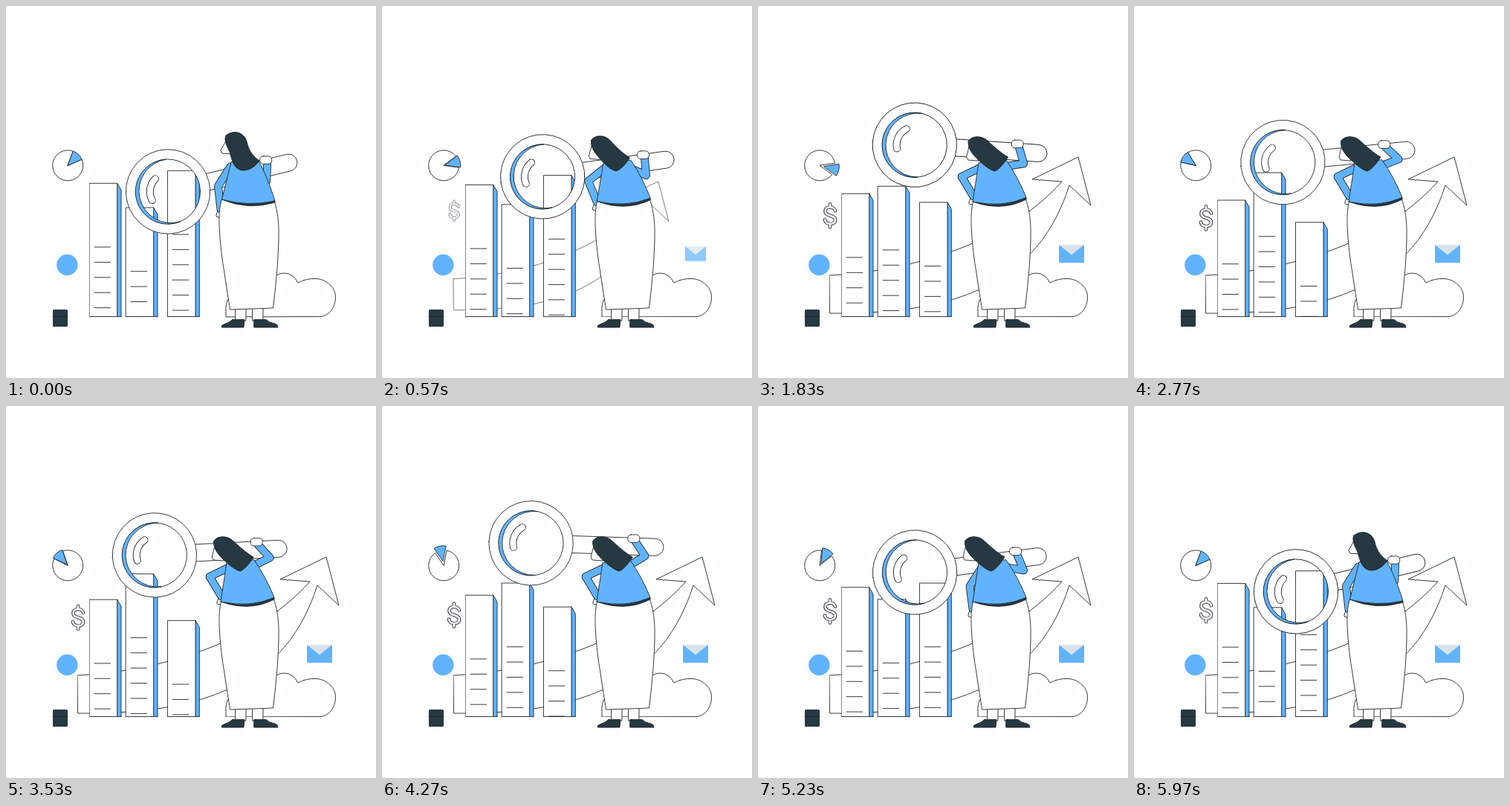
Recreate the animation shown at these times as an HTML page. Size 498 px wide and 500 px high, loop 6010 ms.

```html
<!DOCTYPE html>
<html lang="en">
<head>
<meta charset="utf-8">
<title>Data research</title>
<style>
html, body { margin: 0; width: 100%; height: 100%; overflow: hidden; background: #fff; }
svg { display: block; width: 498px; height: 500px; }
.line { fill: none; stroke: #20282c; stroke-width: .9; stroke-linejoin: round; stroke-linecap: round; vector-effect: non-scaling-stroke; }
.white { fill: #fff; }
.blue { fill: #62b3ff; }
.dark { fill: #263840; }
.tube { fill: none; stroke-linecap: round; stroke-linejoin: round; }

.pop { animation: pop 6.01s infinite; transform-box: fill-box; transform-origin: center; }
#arrow { transform-box: view-box; transform-origin: 96px 388px; }
#bob { animation: bob 6.01s ease-in-out infinite; }
.bar { animation: grow 6.01s cubic-bezier(.4, .06, .7, .9) infinite; }

@keyframes pop {
  0% { scale: .4; opacity: 0; animation-timing-function: cubic-bezier(.2, .5, .4, 1.18); }
  30%, 100% { scale: 1; opacity: 1; }
}
@keyframes bob {
  0%, 100% { translate: 97px 274.5px; }
  50% { translate: 97px 285px; }
}
@keyframes grow {
  0%, 100% { translate: 0 var(--from); }
  50% { translate: 0 var(--to); }
}
</style>
</head>
<body>
<svg viewBox="0 0 498 500">
  <defs>
    <clipPath id="floor"><rect width="498" height="418"/></clipPath>
  </defs>

  <path id="arrow" class="pop line white" d="M96.500 362C190 358 330 325 409 236L369 233 431 203 448 268 419 241C372 391 235 414 97 413Z"/>
  <path class="line white" d="M296 417.500V405Q297 393 303 390L362 363Q375 355 386 363Q390 366 393 372Q404 366 417 366.500C431 367 443.500 378 443.500 391C443.500 406 434 417.500 422 417.500Z"/>
  <g id="bars" clip-path="url(#floor)"></g>

  <g transform="translate(83.2 214.3)">
    <path id="disc" class="line white"/>
    <path id="slice" class="line blue"/>
  </g>
  <g id="bob"><g id="dollar" class="pop"></g></g>
  <circle class="blue" cx="82.3" cy="348" r="14.2"/>
  <rect class="dark" x="63" y="408" width="20" height="23" rx="1.5"/>
  <path class="line" d="M63 417.5H83"/>
  <g class="pop">
    <path class="blue" d="M405 321H439V345H405Z"/>
    <path fill="#d9e4ea" d="M405 321H439L422 334.500Z"/>
  </g>

  <g id="glass">
    <path class="line white" d="M50-11.7H167A11.3 11.3 0 0 1 167 11.3H50Z"/>
    <path class="line white" fill-rule="evenodd" d="M-56.7 0A56.7 56.7 0 1 1 56.7 0A56.7 56.7 0 1 1-56.7 0ZM-43.5 0A43.5 43.5 0 1 0 43.5 0A43.5 43.5 0 1 0-43.5 0Z"/>
    <path class="line blue" d="M7-42.9A43.5 43.5 0 1 0 7 42.9A43 43 0 1 1 7-42.9Z"/>
    <g id="shine"></g>
  </g>

  <g id="leftHand"></g>
  <g id="leftArm"></g>
  <g id="rightArm"></g>
  <rect id="fist" class="line white" x="-8" y="-5" width="16" height="10.5" rx="4.5"/>

  <path class="line white" d="M309 404H323V423H309ZM332 404H346V423H332Z"/>
  <path class="line dark" d="M305 421.5H321L320 432H290.500Q289 429 293 428Q300 426 305 421.500ZM334 421.500H350Q355 426 362 427Q366 428 366 432H334Z"/>
  <path class="line white" d="M290 261C284 280 288 315 291 340L301.500 408 359.500 406C364 370 367.500 330 367 300C367 285 364 270 360 258Z"/>
  <path id="hem" class="line dark"/>
  <path id="face" class="line white"/>
  <path id="shirt" class="line blue"/>
  <path id="hair" class="line dark"/>
</svg>
<script>
const LOOP = 6010, RAD = Math.PI / 180;
const $ = id => document.getElementById(id);
const set = (el, name, value) => el.setAttribute(name, value);
const place = (id, x, y, angle = 0) => set($(id), 'transform', `translate(${x} ${y}) rotate(${angle})`);

const mix = (a, b, q) => a + (b - a) * q;
const rise = (t, from, to) => {
  const u = Math.min(1, Math.max(0, (t - from) / (to - from)));
  return u * u * (3 - 2 * u);
};

// Blends two paths that share the same commands.
function mixPath([a, b], q) {
  const ends = b.match(/[\d.]+/g);
  return a.replace(/[\d.]+/g, n => mix(+n, +ends.shift(), q));
}

function make(parent, cls, d = '') {
  const el = document.createElementNS('http://www.w3.org/2000/svg', 'path');
  set(el, 'class', cls);
  set(el, 'd', d);
  return parent.appendChild(el);
}

// Outlined thick line: a dark stroke below a slightly thinner coloured one.
function tube(id, width, color, d) {
  const paths = [['#20282c', width + .9], [color, width - .9]].map(([stroke, w]) => {
    const el = make($(id), 'tube', d);
    set(el, 'stroke', stroke);
    set(el, 'stroke-width', w);
    return el;
  });
  return (...pts) => paths.forEach(el => set(el, 'd', 'M' + pts.join('L')));
}

// Elbow of an arm with two equal bones; side is 1 or -1.
function elbow([ax, ay], [bx, by], bone, side) {
  const dx = bx - ax, dy = by - ay, dist = Math.hypot(dx, dy);
  const h = side * Math.sqrt(Math.max(0, bone * bone - dist * dist / 4)) / dist;
  return [(ax + bx) / 2 - dy * h, (ay + by) / 2 + dx * h];
}

function addBar(x, from, to) {
  const g = $('bars').appendChild(document.createElementNS('http://www.w3.org/2000/svg', 'g'));
  set(g, 'class', 'bar');
  set(g, 'style', `--from: ${from}px; --to: ${to}px`);
  make(g, 'line blue', `M${x + 37.2} 0L${x + 42.5} 9V260H${x + 37.2}Z`);
  make(g, 'line white', `M${x} 0H${x + 37.2}V260H${x}Z`);
  for (let i = 0; i < 10; i++) make(g, 'line', `M${x + 6.5} ${85.7 + i * 20.4}h21.5`);
  make($('bars'), 'line', `M${x} 417.5h42.5`);
}
addBar(112.5, 238.3, 262);
addBar(161.5, 271, 222);
addBar(217.8, 221.3, 293.8);

tube('shine', 9, '#fff', 'M-12.4-20.8A24.2 24.2 0 0 0-23.4 6.3');
tube('dollar', 3.6, '#fff', 'M7-6.500C5.500-13-6.500-13-6.500-6C-6.500 2 7 -2 7 6C7 13-6.500 13-7 5.500M0-15.500V-11.500M0 11.500V15.500');
const drawLeft = tube('leftArm', 10, '#62b3ff');
const drawHand = tube('leftHand', 6, '#fff');
const drawRight = tube('rightArm', 10, '#62b3ff');

// Upright and leaning versions of each shape
const shapes = {
  hair: [
    'M296 174C306 166 320 169 324 182C327 196 333 202 341 208C335 216 328 221 319 221C306 220 304 206 301 196C297 188 293 180 296 174Z',
    'M280.5 182C284 174 298 174 305 180C315 189 325 198 334 203C329 211 322 220 316 222C308 220 297 210 291 204C284 197 280 190 280.5 182Z'],
  face: ['M299 176L289 194 291 198 304 199Z', 'M283 183L278 203 280 207 294 208Z'],
  shirt: [
    'M303 210L290.5 260Q325 270 362 262Q352 230 341 210Z',
    'M297 211L289 263Q328 272 361 257.5Q350 230 334 207Z'],
  hem: ['M290.5 260Q325 275 362 264V262Z', 'M289 263Q328 277 361 260V257.5Z']
};

// Swing of the magnifier: time, centre x, centre y, angle
const swing = [
  [0, 218, 249.5, -13.4], [1550, 212, 184, 5], [3000, 199.5, 212, -6.3],
  [4200, 200.5, 184, 2], [LOOP, 218, 249.5, -13.4]];

function glassAt(t) {
  const i = swing.findIndex(k => t < k[0]);
  const [from, to] = [swing[i - 1], swing[i]];
  const q = rise(t, from[0], to[0]);
  return [1, 2, 3].map(k => mix(from[k], to[k], q));
}

function drawPie(t) {
  const mid = -47 + 60 * rise(t, 0, 1100) + 202 * rise(t, 1800, 2800) + 98 * rise(t, 2800, LOOP);
  const out = 6.5 * Math.sin(2 * Math.PI * t / LOOP) ** 2, r = 20.5;
  const point = a => [r * Math.cos(a * RAD), r * Math.sin(a * RAD)];
  const from = point(mid - 23), to = point(mid + 23);
  set($('disc'), 'd', `M0 0L${to}A${r} ${r} 0 1 1 ${from}Z`);
  set($('slice'), 'd', `M0 0L${from}A${r} ${r} 0 0 1 ${to}Z`);
  place('slice', out * Math.cos(mid * RAD), out * Math.sin(mid * RAD));
}

function render(t) {
  const [cx, cy, angle] = glassAt(t);
  place('glass', cx, cy, angle);

  const lean = rise(Math.min(t, LOOP - t), 0, 780);
  for (const id in shapes) set($(id), 'd', mixPath(shapes[id], lean));
  const sway = lean * Math.max(-2, (197 - cy) / 4);
  place('hair', sway, 0);
  place('face', sway, 0);

  // The right hand holds a fixed spot on the handle.
  const cos = Math.cos(angle * RAD), sin = Math.sin(angle * RAD);
  const grip = [cx + 138 * cos + 11 * sin, cy + 138 * sin - 11 * cos];
  const shoulder = [330, 216];
  drawRight(shoulder, elbow(shoulder, grip, 28, 1), [grip[0] + 2, grip[1] + 4]);
  place('fist', ...grip);

  // The left hand rests on the hip, then drops.
  const hip = rise(t, 0, 1100) - rise(t, 4300, 5300);
  const hand = [289 + hip, 273 - 17 * hip], joint = [302, 216];
  drawLeft(joint, elbow(joint, hand, 31, 1), hand);
  drawHand([hand[0] - 1, hand[1] + 2], [hand[0] - 3, hand[1] + 8]);

  drawPie(t);
}

const start = performance.now();
function tick() {
  render((performance.now() - start) % LOOP);
  requestAnimationFrame(tick);
}
render(0);
requestAnimationFrame(tick);
</script>
</body>
</html>
```
